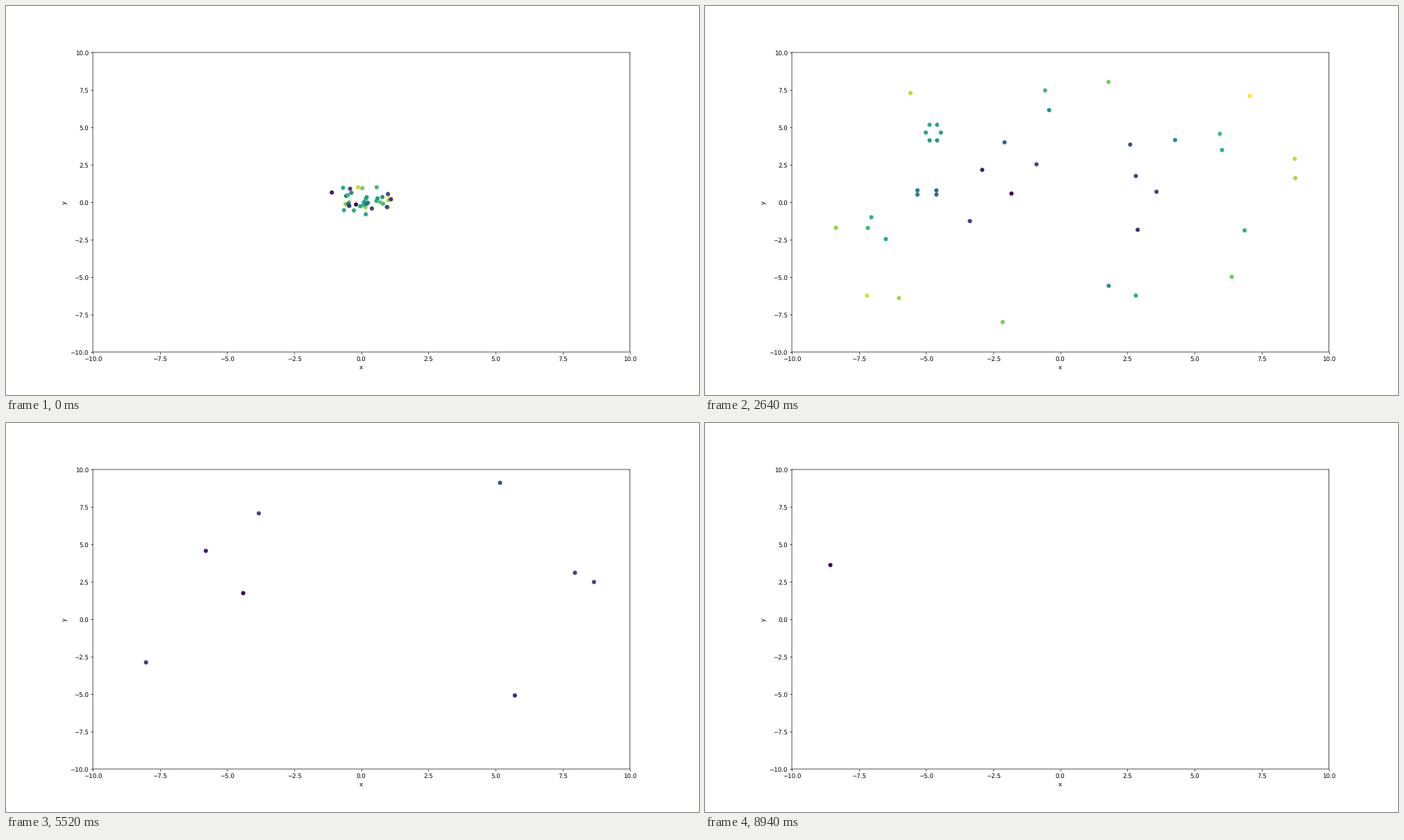
A matplotlib script for the animation above (9 s loop, 998 by 561 pixels).

```python
import numpy as np
import matplotlib.pyplot as plt
from matplotlib.animation import FuncAnimation

FRAMES, INTERVAL = 150, 60
WIDTH, HEIGHT, DPI = 998, 561, 62.375
REACH = 44      # frame at which every particle meets its waypoint
SPEED_UP = 0.005

# Slow particles near the centre: start x, y and waypoint x, y.
SLOW = np.array([
    (-0.20, -0.15, -1.82, 0.58), (-0.45, -0.24, -3.37, -1.26),
    (-1.10, 0.65, -2.91, 2.16), (1.10, 0.20, 2.88, -1.84),
    (0.95, -0.32, -0.89, 2.53), (0.99, 0.55, 2.60, 3.85),
    (-0.42, 0.90, 2.81, 1.75), (0.39, -0.42, 3.58, 0.70),
])
# Waypoints of the fast particles, anticlockwise from the right.
FAST = [
    (8.75, 1.61), (8.73, 2.90), (6.02, 3.49), (5.94, 4.57), (4.27, 4.15),
    (7.05, 7.10), (1.79, 8.03), (-0.42, 6.15), (-0.57, 7.47), (-2.08, 4.00),
    (-5.58, 7.29), (-7.04, -1.00), (-8.36, -1.70), (-7.17, -1.72),
    (-6.50, -2.46), (-7.20, -6.23), (-6.01, -6.40), (-2.15, -8.00),
    (1.80, -5.58), (2.81, -6.23), (6.38, -4.98), (6.86, -1.88),
]


def ring(n, x, y, rx, ry, phase=0.0):
    a = phase + 2 * np.pi * np.arange(n) / n
    return np.column_stack([x + rx * np.cos(a), y + ry * np.sin(a)])


rng = np.random.default_rng(4)
fast = np.vstack([FAST, ring(6, -4.73, 4.65, 0.28, 0.6),
                  ring(4, -4.97, 0.65, 0.5, 0.2, np.pi / 4)])
home = np.vstack([0.03 * fast, SLOW[:, :2]])
goal = np.vstack([fast, SLOW[:, 2:]])
travel = goal - home

# The fast particles begin scattered over the unit square.
scatter = np.zeros_like(home)
start = 0.07 * fast + rng.uniform(-0.65, 0.65, fast.shape)
scatter[:len(fast)] = np.clip(start, -1, 1) - home[:len(fast)]


def positions(t):
    grow = t / REACH * (1 + SPEED_UP * (t - REACH))
    fade = max(0, 1 - t / REACH) ** 2
    return home + travel * grow + scatter * fade


plt.rcParams["text.hinting"] = "none"
fig, ax = plt.subplots(figsize=(WIDTH / DPI, (HEIGHT + 0.001) / DPI), dpi=DPI)
fig.subplots_adjust(left=125.06 / WIDTH, right=898.5 / WIDTH,
                    bottom=62 / HEIGHT, top=494 / HEIGHT)
ax.set(xlim=(-10, 10), ylim=(-10, 10), xlabel="x", ylabel="y")
for spine in ax.spines.values():
    spine.set_snap(False)

dots = ax.scatter(*positions(0).T, c=np.hypot(*travel.T), cmap="viridis")


def update(frame):
    dots.set_offsets(positions(frame))
    return (dots,)


anim = FuncAnimation(fig, update, frames=FRAMES, interval=INTERVAL,
                     repeat=True, repeat_delay=0, blit=False)
plt.show()
```
